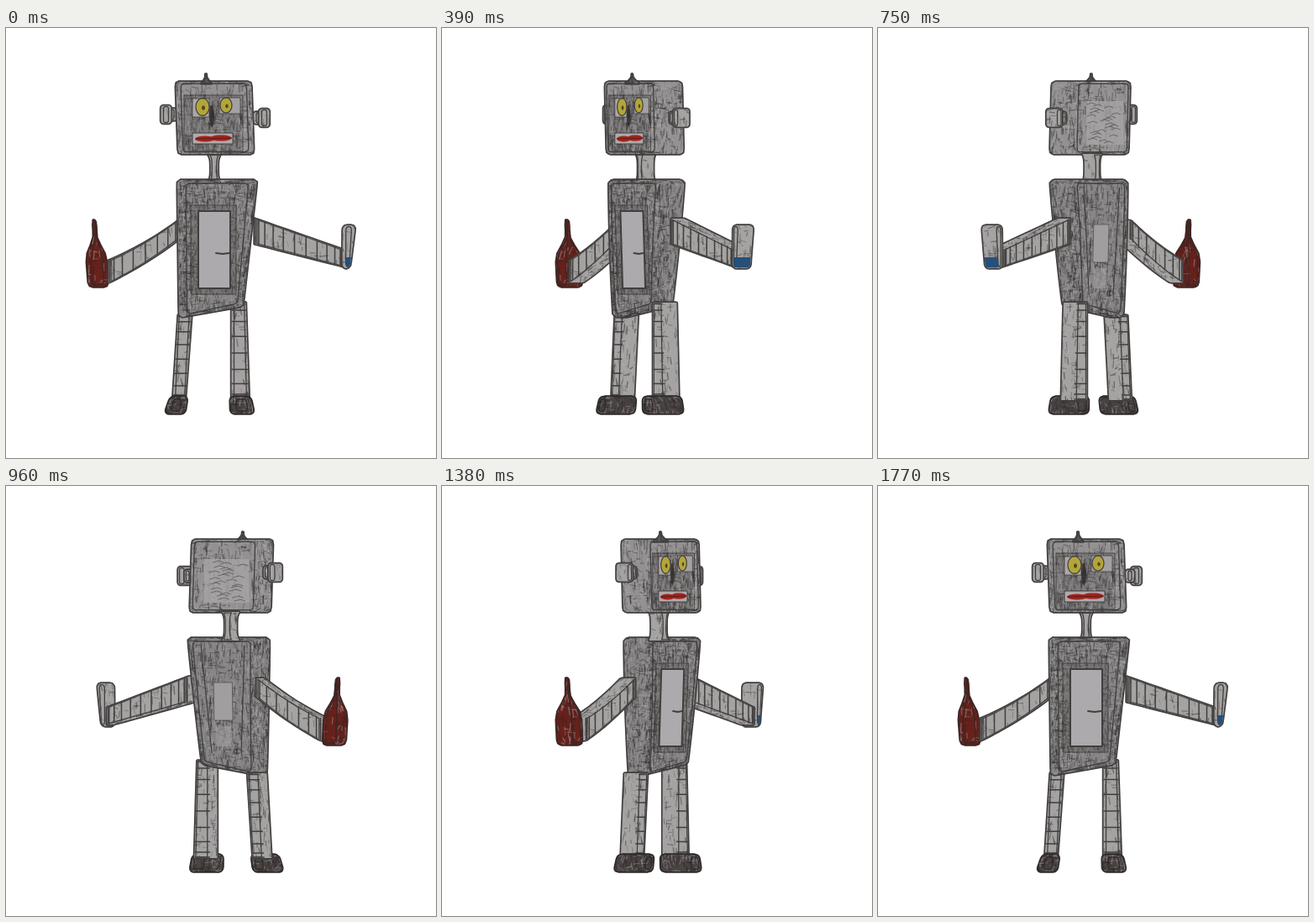
An HTML page with a canvas that plays this animation: 512x512 px, repeating every 1.8 s.

```html
<!DOCTYPE html>
<html>
<head>
<meta charset="utf-8">
<style>
html, body { margin: 0; width: 100%; height: 100%; overflow: hidden; background: #fff; }
canvas { display: block; width: 512px; height: 512px; }
</style>
</head>
<body>
<canvas id="stage" width="512" height="512"></canvas>
<script>
const ctx = document.getElementById('stage').getContext('2d');
const MID = 256, STEP = 30, STEPS = 60, ROWS = 12;
const INK = '#413e3e', PAPER = '#a5a2a2', PENCIL = '#878585', SHADE = 'rgba(60,57,57,.25)';
let cos = 1, sin = 0, seed = 1;

const rnd = () => (seed = (seed * 16807) % 2147483647) / 2147483647;
const clamp = (v, lo, hi) => Math.min(hi, Math.max(lo, v));
const smooth = x => (x = clamp(x, 0, 1)) * x * (3 - 2 * x);
const mix = (a, b, t) => a + (b - a) * t;
const lerp = (a, b, t) => a.map((v, i) => mix(v, b[i], t));
const project = ([x, y, z]) => [MID + (x - MID) * cos - z * sin, y];
const area = p => p.reduce((sum, [x, y], i) => {
  const [nx, ny] = p[(i + 1) % p.length];
  return sum + x * ny - nx * y;
}, 0) / 2;

function addPath(points) {
  points.forEach((p, i) => i ? ctx.lineTo(...p) : ctx.moveTo(...p));
  ctx.closePath();
}

function stroke(points, color, width) {
  ctx.beginPath();
  points.forEach(p => ctx.lineTo(...p));
  ctx.strokeStyle = color;
  ctx.lineWidth = width;
  ctx.stroke();
}

// Pencil strokes on a surface of w by h pixels; at(u, v) gives the place on screen
function scribble(at, w, h, density) {
  const count = Math.floor(w * h * density / 100 + rnd());
  for (let i = 0; i < count; i++) {
    const u = rnd(), v = rnd(), length = 3 + rnd() * 7, wobble = (rnd() - 0.5) * 4;
    const [dx, dy] = rnd() < 0.3 ? [length, wobble] : [wobble, length];
    const color = rnd() < 0.25 ? 'rgba(178,175,176,.4)' : `rgba(40,37,37,${0.15 + rnd() * 0.35})`;
    stroke([at(u, v), at(u + dx / w, v + dy / h)], color, 0.7 + rnd() * 0.8);
  }
}

// Drawing tools for a flat side, in the coordinates of the front view
function pen(at) {
  const shape = (pts, fill, edge) => {
    const p = pts.map(q => at(...q));
    ctx.beginPath();
    addPath(p);
    ctx.fillStyle = fill;
    ctx.fill();
    if (edge) stroke([...p, p[0]], INK, edge);
  };
  return {
    line: (pts, width, color = INK) => stroke(pts.map(p => at(...p)), color, width),
    box: (x, y, w, h, fill, edge) => shape([[x, y], [x + w, y], [x + w, y + h], [x, y + h]], fill, edge),
    oval: (x, y, rx, ry, fill, edge) => shape(Array.from({ length: 20 }, (_, i) =>
      [x + rx * Math.cos(i * Math.PI / 10), y + ry * Math.sin(i * Math.PI / 10)]), fill, edge),
    hatch: (x, y, w, h, density) => scribble((u, v) => at(x + u * w, y + v * h), w, h, density)
  };
}

function face(d) {
  d.box(212, 80, 70, 67, SHADE, 0.9);
  d.hatch(212, 80, 70, 67, 5);
  d.box(222, 84, 20, 22, '#aba8a5', 0.8);
  d.box(254, 83, 25, 19, '#a3a1a1', 0.8);
  [[234, 94, 8], [262, 92, 7]].forEach(([x, y, r]) => {
    d.oval(x, y, r, r * 1.3, '#b3a53a', 1.2);
    d.oval(x + 1, y + 1, r / 4, r / 3, '#4f491d');
  });
  d.oval(245, 105, 3, 13, 'rgba(45,42,42,.85)');
  d.box(222, 125, 48, 13, '#aeabac', 1);
  d.oval(237, 132, 12, 3.4, '#a3231e');
  d.oval(256, 131, 13, 3.6, '#a3231e');
  d.line([[226, 132], [268, 131]], 0.9, '#5b1613');
}

function headBack(d) {
  d.box(216, 87, 58, 52, 'rgba(168,166,167,.75)');
  for (let i = 0; i < 24; i++) {
    const x = 216 + rnd() * 44, y = 89 + i * 2;
    d.line([[x, y + 2], [x + 6, y], [x + 14, y + 2]], 1, 'rgba(60,57,57,.55)');
  }
}

function chest(d) {
  d.hatch(204, 186, 92, 24, 6);
  d.hatch(205, 210, 24, 124, 5);
  d.box(220, 211, 54, 106, SHADE, 0.9);
  d.box(229, 218, 38, 92, '#acaaac', 2);
  d.line([[250, 268], [258, 269], [266, 268]], 1.8);
}

function chestBack(d) {
  d.box(238, 234, 24, 45, '#a09e9f', 0.6);
  d.box(240, 286, 20, 24, 'rgba(163,161,163,.5)');
  [[222, 228], [278, 266]].forEach(([top, bottom]) => d.line([[top, 190], [bottom, 318]], 1.2));
}

/* A solid grown along one axis (down, or rightwards if across is set):
   mid and half give its centre line and half width at both ends, z its back and front,
   round its corner radius and bevel the radius of the rims at back and front. */
function solid({ from, to, mid, half, z, round = 3, bevel = 3, sag = 0, slope = 0, across,
  width = () => 1, depth = () => 1, ...look }) {
  const edge = side => Array.from({ length: ROWS + 1 }, (_, i) => {
    const s = (1 - Math.cos(Math.PI * i / ROWS)) / 2, pos = mix(from, to, s);
    const gap = Math.max(0, round - Math.min(pos - from, to - pos));
    const inset = round - Math.sqrt(round * round - gap * gap);
    const reach = Math.max(0.5, mix(...half, s) * width(s) - inset);
    const value = mix(...mid, s) + sag * 4 * s * (1 - s) + side * reach;
    return across ? [pos, value] : [value, pos + slope * s * side / 2];
  });
  const first = edge(across ? -1 : 1), second = edge(across ? 1 : -1);
  const pts = [...first, ...[...second].reverse()];
  const xs = pts.map(p => p[0]), ys = pts.map(p => p[1]);
  const x = Math.min(...xs), y = Math.min(...ys);
  const w = Math.max(...xs) - x, h = Math.max(...ys) - y;
  const cx = x + w / 2, cy = y + h / 2, cz = (z[0] + z[1]) / 2;
  const depthAt = (d, y) => cz + (d - cz) * (across ? 1 : depth(clamp((y - from) / (to - from), 0, 1)));

  const rim = [0, 0.5, 1].map(k => k * Math.PI / 2);
  const ring = (d, a) => {
    const inset = bevel * (1 - Math.sin(a));
    const kx = 1 - 2 * inset / w, ky = 1 - 0.8 * inset / h;
    return pts.map(([px, py]) => {
      const qy = cy + (py - cy) * ky;
      return [cx + (px - cx) * kx, qy, depthAt(d, qy)];
    });
  };
  const curve = a => bevel * (1 - Math.cos(a));
  const loops = [...rim.map(a => ring(z[0] + curve(a), a)),
    ...rim.reverse().map(a => ring(z[1] - curve(a), a))];
  return { first, second, x, y, w, h, cx, cz, z, depthAt, loops, fill: PAPER, density: 2, ink: INK, ...look };
}

const parts = [
  solid({ from: 64, to: 150, mid: [247, 250], half: [45, 45], z: [-9, 37], round: 4, bevel: 6,
    fill: '#939191', density: 4.5, front: face, back: headBack }),
  solid({ from: 181, to: 338, mid: [251.5, 244], half: [47.5, 38], z: [-9, 35], round: 4, bevel: 10, slope: -12,
    depth: s => 1 - 0.28 * s * s, fill: PENCIL, density: 6.5, front: chest, back: chestBack }),
  solid({ from: 150, to: 184, mid: [248, 248], half: [8, 8], z: [1, 21], round: 0,
    width: s => 0.55 + 0.45 * (2 * s - 1) ** 4 })
];

const spike = s => s * s;
parts.push(solid({ from: 55, to: 66, mid: [238, 238.5], half: [6, 6], z: [18, 30], round: 0, bevel: 1,
  width: spike, depth: spike, fill: '#5d5a5a' }));

[-1, 1].forEach(side => {
  const ear = (x, half, y, tall) => solid({ from: y - tall, to: y + tall, mid: [x, x], half: [half, half], z: [2, 20] });
  const y = 105 + side * 2;
  parts.push(ear(249 + side * 51, 5, y, 7), ear(249 + side * 58.5, 6, y, 10.5));
});

[{ hip: 213, ankle: 206, top: 342, half: [8, 7.5], toe: 201, sole: 12 },
 { hip: 277, ankle: 279, top: 327, half: [8.5, 10.5], toe: 281.5, sole: 14 }].forEach(leg => {
  parts.push(
    solid({ from: leg.top, to: 443, mid: [leg.hip, leg.ankle], half: leg.half, z: [-5, 21], round: 0, bands: 9 }),
    solid({ from: 439, to: 459, mid: [leg.ankle, leg.toe], half: [leg.sole - 2, leg.sole], z: [-9, 39], round: 5, bevel: 7,
      fill: '#4a4443', density: 6, ink: '#2e2929' }));
});

const bulb = s => 0.1 + 0.9 * smooth((s - 0.2) / 0.4);
parts.push(
  solid({ from: 122, to: 207, mid: [290, 240], half: [13, 11], z: [-10, 14], round: 0, sag: 3, across: true, bands: 9 }),
  solid({ from: 296, to: 402, mid: [242, 274], half: [15, 10], z: [-6, 18], round: 0, across: true, bands: 12 }),
  solid({ from: 229, to: 308, mid: [104.5, 110], half: [12, 11.5], z: [-12, 12], round: 5, bevel: 5,
    width: bulb, depth: bulb, fill: '#68211b', density: 4, ink: '#3a2624' }),
  solid({ from: 235, to: 286, mid: [408.5, 405], half: [7.5, 4.5], z: [-4, 20], round: 5, bevel: 4, tip: '#24507a' }));

function facesOf(part) {
  const { loops, depthAt } = part, faces = [];
  const cap = (loop, z, side) => {
    const draw = (x, y) => project([x, y, depthAt(z, y)]);
    faces.push({ side, poly: loop.map(project), w: part.w, h: part.h, draw,
      at: (u, v) => draw(part.x + u * part.w, part.y + v * part.h) });
  };
  cap([...loops[0]].reverse(), part.z[0], 'back');
  for (let j = 0; j + 1 < loops.length; j++) {
    loops[j].forEach((b, i) => {
      const n = (i + 1) % loops[j].length, bn = loops[j][n], f = loops[j + 1][i], fn = loops[j + 1][n];
      faces.push({ poly: [fn, f, b, bn].map(project), right: b[0] > part.cx,
        w: Math.hypot(f[0] - b[0], f[2] - b[2]) + 0.1, h: Math.hypot(bn[0] - b[0], bn[1] - b[1]) + 0.1,
        at: (u, v) => project(lerp(lerp(b, bn, v), lerp(f, fn, v), u)) });
    });
  }
  cap(loops.at(-1), part.z[1], 'front');
  faces.forEach((f, i) => f.seed = i + 1);
  return faces.filter(f => area(f.poly) > 0.05);
}

function drawBands(part, f) {
  const along = (line, t) => {
    const pos = t * ROWS, i = Math.min(Math.floor(pos), ROWS - 1);
    return f.draw(...lerp(line[i], line[i + 1], pos - i));
  };
  for (let i = 0; i < part.bands; i++) {
    const t = (i + 0.6) / part.bands;
    stroke([along(part.first, t), along(part.second, t)], INK, 1.5);
  }
}

function drawPart(part, id) {
  const faces = facesOf(part);
  ctx.beginPath();
  faces.forEach(f => addPath(f.poly));
  ctx.strokeStyle = part.ink;
  ctx.lineWidth = 3.4;
  ctx.stroke();
  ctx.save();
  ctx.fillStyle = part.fill;
  ctx.fill();
  ctx.clip();
  faces.forEach(f => {
    seed = (id + 1) * 7919 + f.seed * 104729;
    scribble(f.at, f.w, f.h, part.density);
  });
  faces.filter(f => f.side).forEach(f => {
    if (part.bands) drawBands(part, f);
    if (part[f.side]) part[f.side](pen(f.draw));
    stroke([...f.poly, f.poly[0]], part.ink, 1.3);
  });
  if (part.tip) {
    ctx.beginPath();
    faces.filter(f => f.right || f.side === 'front').forEach(f => addPath(f.poly));
    ctx.clip();
    ctx.fillStyle = part.tip;
    ctx.fillRect(0, 273, 512, 20);
  }
  ctx.restore();
}

function render(step) {
  const turn = smooth(step / (STEPS - 1)) * 2 * Math.PI;
  cos = Math.cos(turn);
  sin = Math.sin(turn);
  ctx.fillStyle = '#fff';
  ctx.fillRect(0, 0, 512, 512);
  const near = p => (p.cx - MID) * sin + p.cz * cos;
  [...parts].sort((a, b) => near(a) - near(b)).forEach(p => drawPart(p, parts.indexOf(p)));
}

ctx.lineJoin = ctx.lineCap = 'round';
let shown = -1;
function tick() {
  const step = Math.floor(performance.now() / STEP) % STEPS;
  if (step !== shown) render(shown = step);
  requestAnimationFrame(tick);
}
tick();
</script>
</body>
</html>
```
